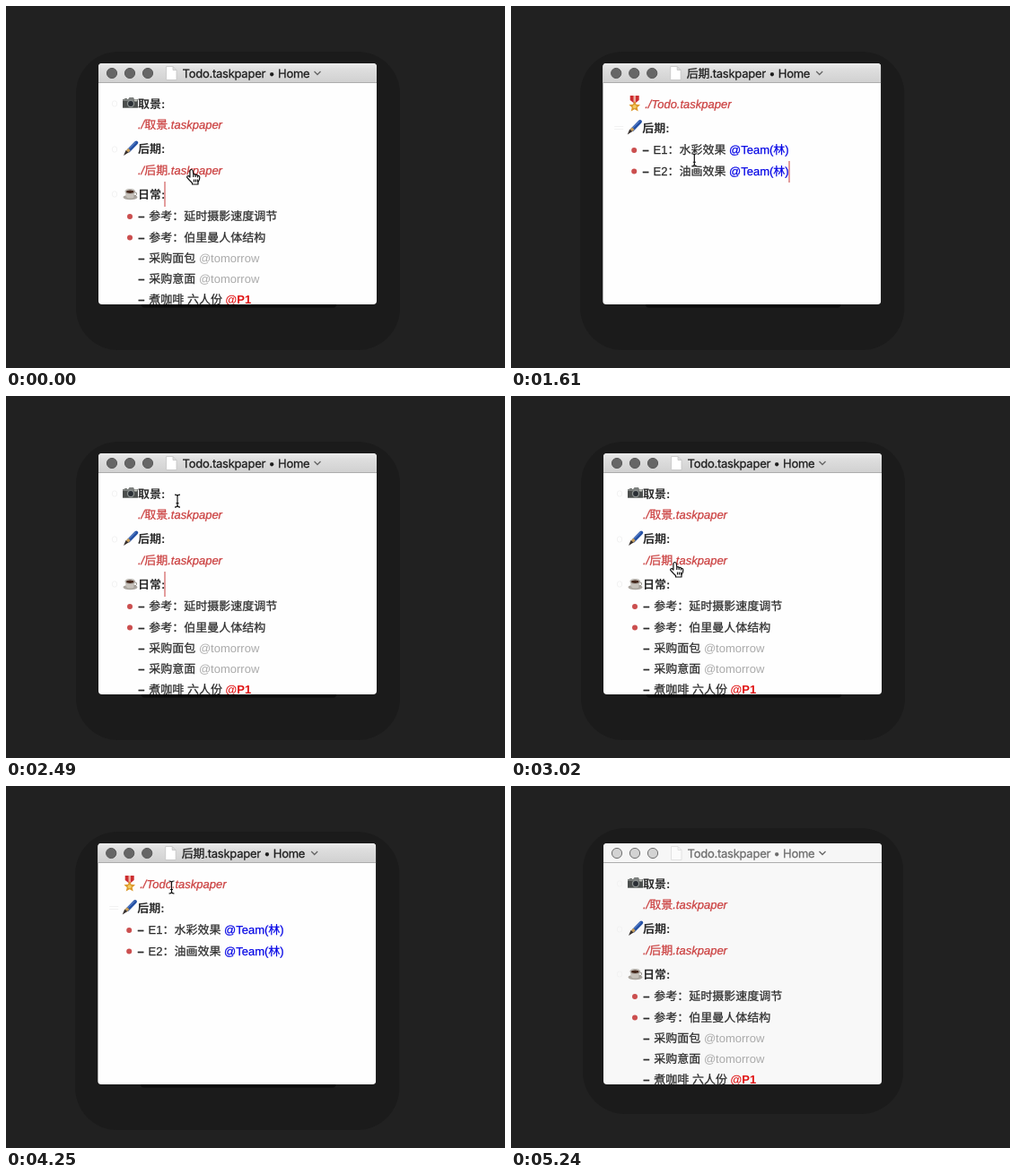
An HTML page that plays this animation: 556 by 404 pixels, repeating every 5.34 s.

```html
<!DOCTYPE html>
<html lang="zh-CN">
<head>
<meta charset="utf-8">
<style>
  html, body { margin: 0; width: 100%; height: 100%; overflow: hidden; background: #212121; }
  svg { display: block; }
  text { font: 13px "Liberation Sans", "Noto Sans CJK SC", sans-serif; color: #2b2b2b; white-space: pre; text-rendering: geometricPrecision; }
  text, tspan { fill: currentColor; stroke: currentColor; stroke-width: .25; }
  .title { font-family: Inter, "Noto Sans CJK SC", sans-serif; letter-spacing: -.25px; color: #1c1c1c; }
  .head, .dash, .urgent { font-weight: bold; }
  .head, .urgent { stroke-width: 0; }
  .link { color: #cb4040; font-style: italic; }
  .cjk { font-style: normal; }
  .later { color: #aaa; stroke-width: 0; }
  .urgent { color: #e01010; }
  .team { color: #0808e6; }
  .dot { fill: #cb4f4f; }
  .caret { fill: #dc8585; }
  .fold { fill: none; stroke: #f2f2f2; }
  .light { fill: #666; stroke: #5a5a5a; }
  .bar { fill: url(#bar); }
  .body { fill: #fefefe; }
  .inactive .light { fill: #d3d3d3; stroke: #707070; }
  .inactive .title { color: #6c6c6c; }
  .inactive .doc { opacity: .5; }
  .inactive .bar { fill: #f6f6f6; }
  .inactive .body { fill: #f8f8f8; }
  .inactive .edge { display: none; }
</style>
</head>
<body>
<svg id="stage" width="556" height="404" viewBox="0 0 556 404"></svg>
<script>
const LOOP = 5340, STEP = 88;

// Switch time and document shown from then on
const SCENES = [[0, 'todo'], [1340, 'post'], [2310, 'todo'], [3280, 'post'], [4340, 'todo']];
const CARET_ON = [[0, 540], [1080, 1880], [2310, 2850], [3280, 3820], [4340, 4860]];
const CLICKS = [[1250, 1340], [2230, 2310], [4250, 4340]];
// Pointer moves: start, number of steps, target x, y
const START = [206.5, 183];
const MOVES = [
  [1610, 4, 192.5, 111], [2050, 1, 191.5, 113], [2490, 7, 182.5, 186],
  [3550, 5, 184.5, 113], [4510, 1, 450, 219]
];
const POINTER_GONE = 4600;
const LINKS = { todo: [[124, 144], [175, 195]], post: [[101, 122]] };
const BEAM = 'M-3-7Q0-7 0-5Q0-7 3-7M0-5V5M-3 7Q0 7 0 5Q0 7 3 7M-1.5 2.5h3';

const text = (x, y, content, cls = '') => `<text x="${x}" y="${y}" class="${cls}">${content}</text>`;
const span = (cls, content) => `<tspan class="${cls}">${content}</tspan>`;
const at = (x, y, content) => `<g transform="translate(${x} ${y})">${content}</g>`;
const item = (y, content) => text(147.3, y, '–', 'dash') + text(159.3, y, content);
const dot = y => `<circle class="dot" cx="138" cy="${y}" r="3"/>`;
const fold = y => `<rect class="fold" x="118.5" y="${y - 3}" width="5" height="6" rx="2"/>`;
const fileLink = (y, name) => text(147, y, `./${span('cjk', name)}.taskpaper`, 'link');
const caret = (x, y, h) => `<rect class="caret" x="${x}" y="${y}" width="1.6" height="${h}"/>`;

const icons = {
  camera: `<path d="M0 2.5H2V1.5H5V2.5H6L7.5 .5H12L13 2.5H17V12.5H0Z" fill="#7c7f7d"/>
    <path d="M0 4.5H17V11.5H0Z" fill="#4b4e4d"/>
    <circle cx="9" cy="7.5" r="4.2" fill="#8d9290"/><circle cx="9" cy="7.5" r="2.9" fill="#2a2f35"/>
    <rect x="13" y="3" width="3" height="2" fill="#c5c7c2"/>`,
  brush: `<path d="M15.2 2L6.5 11" stroke="#2450a4" stroke-width="4" stroke-linecap="round"/>
    <path d="M14.5 1.5L7 9" stroke="#6c93d8"/><path d="M7.5 9.5L5 12" stroke="#c59a55" stroke-width="3.6"/>
    <path d="M3.5 10.500L6.5 13L1 16.5Z" fill="#37302d"/>`,
  coffee: `<ellipse cx="8.5" cy="11" rx="8" ry="2.7" fill="#aaa59e"/>
    <path d="M3 4.500Q3 11.5 6 12H11Q13.500 11.5 13.500 4.500Z" fill="#c6c1ba"/>
    <path d="M13.500 5.500q2.800 0 2 2.300t-3 1.500" fill="none" stroke="#8f8a83"/>
    <ellipse cx="8.300" cy="4.400" rx="5.300" ry="2.300" fill="#d9d6d1" stroke="#8d8780" stroke-width=".7"/>
    <ellipse cx="8.300" cy="4.700" rx="4.300" ry="1.700" fill="#45291d"/>`,
  medal: `<path d="M1.5 0H11.5V5L6.5 9L1.5 5Z" fill="#cc2d30"/><path d="M5.3 0h2.4v7.5h-2.4z" fill="#efb2a5"/>
    <path d="M6.5 6L8.3 9.8L12.8 10.3L9.5 13.2L10.5 17.5L6.5 15.3L2.5 17.5L3.5 13.2L.2 10.3L4.7 9.8Z" fill="#dc9a2c"/>
    <circle cx="6.5" cy="12.3" r="2" fill="#f2cb62"/>`
};

const docs = {
  todo: {
    title: 'Todo.taskpaper • Home', chevron: 347,
    body: [109, 160, 210].map(fold).join('') +
      at(130, 101.5, icons.camera) + text(147, 113.5, '取景:', 'head') + fileLink(137, '取景') +
      at(130, 150.5, icons.brush) + text(147, 164, '后期:', 'head') + fileLink(188, '后期') +
      at(130, 202.5, icons.coffee) + text(147, 215, '日常:', 'head') +
      dot(235) + item(239, '参考：延时摄影速度调节') +
      dot(258.5) + item(262.5, '参考：伯里曼人体结构') +
      item(286, `采购面包 ${span('later', '@tomorrow')}`) +
      item(309, `采购意面 ${span('later', '@tomorrow')}`) +
      item(332, `煮咖啡 六人份 ${span('urgent', '@P1')}`) + caret(176.2, 196, 28)
  },
  post: {
    title: '后期.taskpaper • Home', chevron: 344.5,
    body: at(132, 100, icons.medal) + text(150, 114, './Todo.taskpaper', 'link') +
      '<path class="fold" d="M116 134.5h10m-10 3h10"/>' +
      at(129.5, 127, icons.brush) + text(147, 141, '后期:', 'head') +
      ['E1：水彩效果', 'E2：油画效果'].map((name, i) =>
        dot(161 + i * 23.5) + item(165 + i * 23.5, `${name} ${span('team', '@Team(林)')}`)).join('') +
      caret(310, 173, 24)
  }
};

const windowFor = id => `<g id="${id}" clip-path="url(#frame)">
  <rect class="body" x="103" y="64" width="310" height="269"/>
  <rect class="bar" x="103" y="64" width="310" height="22"/>
  <path d="M103 85.5H413" stroke="#adadad"/>
  ${[118, 138, 158].map(x => `<circle class="light" cx="${x}" cy="75" r="5.6"/>`).join('')}
  <path class="doc" d="M178.5 67.5H186L190 71.5V82.5H178.5ZM186 67.5V71.5H190" fill="#fff" stroke="#c5c5c5" stroke-width=".8"/>
  ${text(196.5, 80, docs[id].title, 'title')}
  <path d="M${docs[id].chevron - 3.5} 73l3.5 3.5l3.5-3.5" fill="none" stroke="#666" stroke-width="1.3"/>
  ${docs[id].body}</g>`;

const stage = document.getElementById('stage');
stage.innerHTML = `<defs>
  <linearGradient id="bar" x2="0" y2="1"><stop stop-color="#ebebeb"/><stop offset=".3" stop-color="#dedede"/><stop offset="1" stop-color="#d0d0d0"/></linearGradient>
  <clipPath id="frame"><rect x="103" y="64" width="310" height="269" rx="4"/></clipPath></defs>
  <rect id="shadow" fill="#1b1b1b"/>
  <g id="window"><rect class="edge" x="151" y="330" width="217" height="6.5" rx="3" fill="#0b0b0b"/>
  ${windowFor('todo')}${windowFor('post')}</g>
  <g id="pointer" stroke-linejoin="round">
    <path id="hand" d="M-1.6 8V1.300Q-1.200-.6 .2-.5Q1.5-.4 1.800 1.300L2.300 5Q4-.2+5 4.500 5.500Q6.500 4.800 7 6.500Q9.300 6 9.300 8.500Q9.300 11.500 7.500 13.500V16H1V14.500L-2 11.500L-4.800 8.300Q-5 6.300-3 6.600ZM3 10.500v3m2-3v3m2-3v3M2.300 5V8M4.700 6V8M7 7V8.500" fill="#fff" stroke="#111" stroke-width="1.2"/>
    <g id="beam" fill="none">
      <path d="${BEAM}" stroke="#fff" stroke-width="2.6" opacity=".8"/><path d="${BEAM}" stroke="#111" stroke-width="1.2"/>
    </g>
    <path id="arrow" d="M0 0V14L3.3 11L5.7 16.5L8 15.5L5.7 10.2H10.3Z" fill="#111" stroke="#fff"/>
  </g>`.replace('Q4-.2+5 4.500 5.500', 'Q4 4 4.500 5.500');

const $ = id => document.getElementById(id);
const show = (el, on) => el.style.display = on ? '' : 'none';
const within = (ranges, v) => ranges.some(([a, b]) => v >= a && v < b);
const ease = p => p * p * (3 - 2 * p);

function pointerAt(t) {
  let [x, y] = START;
  for (const [start, steps, toX, toY] of MOVES) {
    if (t < start) break;
    const p = ease(Math.min(1, (Math.floor((t - start) / STEP) + 1) / steps));
    x += (toX - x) * p;
    y += (toY - y) * p;
  }
  return [x, y];
}

function render(t) {
  const scene = SCENES.filter(([start]) => t >= start).pop()[1];
  const inactive = t >= 5240;
  const shift = scene === 'post' ? -.8 : 0;
  for (const id in docs) show($(id), id === scene);
  for (const el of document.querySelectorAll('.caret')) show(el, within(CARET_ON, t));

  $('window').setAttribute('class', inactive ? 'inactive' : '');
  $('window').setAttribute('transform', `translate(${shift} 0)`);
  const [x, y, width, height] = inactive ? [80, 47, 357, 319] : [78 + shift, 51, 361, 333];
  Object.entries({ x, y, width, height, rx: 47 }).forEach(([k, v]) => $('shadow').setAttribute(k, v));

  const [px, py] = pointerAt(t);
  const outside = px > 413;
  const hand = !outside && within(LINKS[scene], py) && !within(CLICKS, t);
  show($('pointer'), t < POINTER_GONE);
  show($('arrow'), outside);
  show($('hand'), hand);
  show($('beam'), !outside && !hand);
  $('pointer').setAttribute('transform', `translate(${px} ${py})`);
}

const began = performance.now();
function tick() {
  render((performance.now() - began) % LOOP);
  requestAnimationFrame(tick);
}
tick();
</script>
</body>
</html>
```
